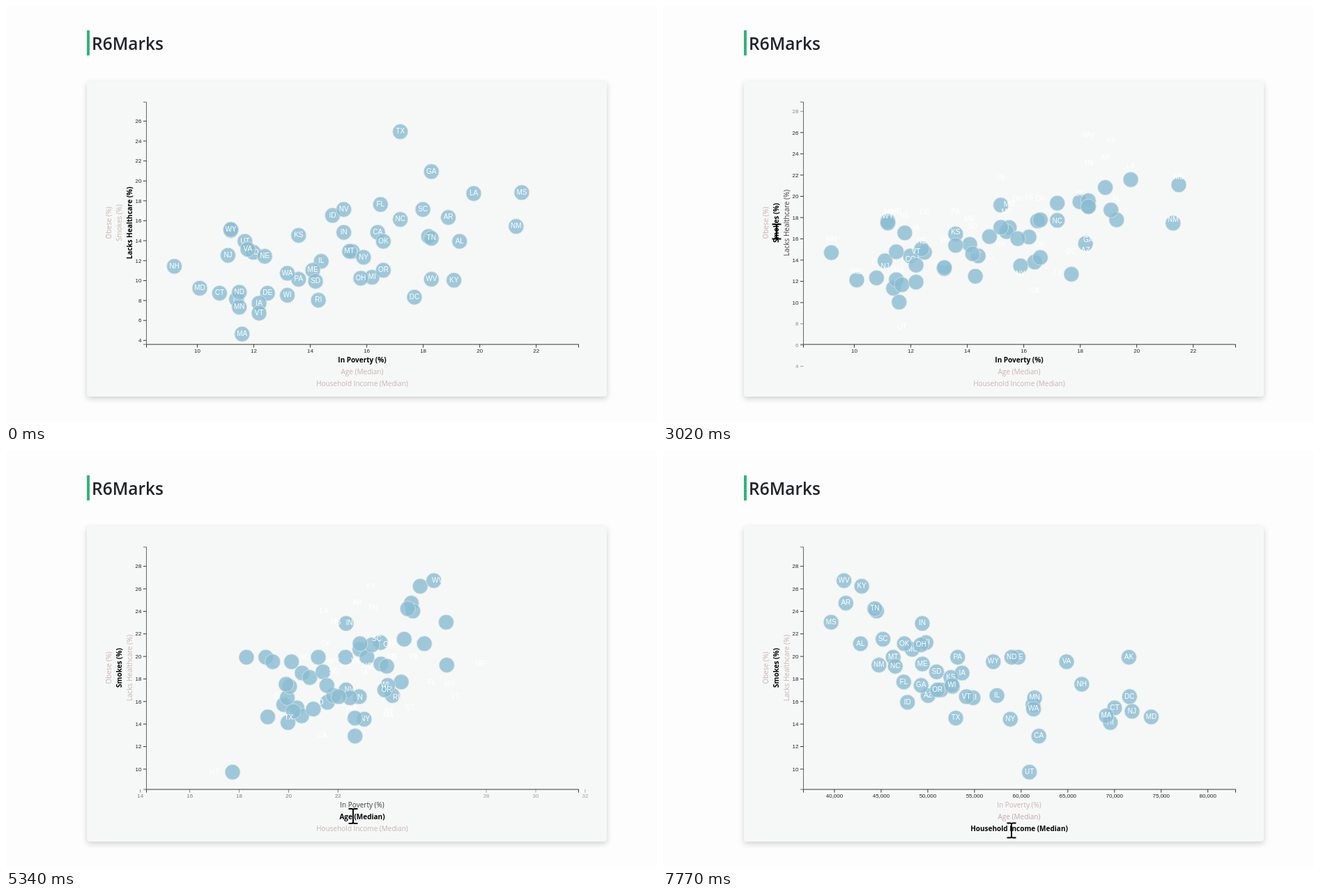
Animation, 934 px wide and 599 px high, one loop 8 s. Source, as an HTML page:

```html
<!DOCTYPE html>
<html lang="en">
<head>
<meta charset="utf-8">
<title>State chart</title>
<style>
  html, body { margin: 0; width: 100%; height: 100%; overflow: hidden; background: #fdfdfd; }
  #title {
    position: absolute; left: 123px; top: 35px; line-height: 36px;
    font: 600 24.5px/38px "Open Sans", "Noto Sans", sans-serif; color: #1f2428;
  }
  #bar { position: absolute; left: 116px; top: 35px; width: 4px; height: 36px; background: #30b573; }
  #card {
    position: absolute; left: 116px; top: 108px; width: 746px; height: 453px;
    background: #f6f8f7; border-radius: 4px; box-shadow: 0 3px 8px rgba(0, 0, 0, .18);
  }
  svg { position: absolute; left: 0; top: 0; width: 934px; height: 599px; }
  .tick text { font: 8px "Liberation Sans", Arial, sans-serif; fill: #222; }
  .tick line, .axis { stroke: #222; stroke-width: .9; fill: none; }
  .state circle { fill: #89bdd3; stroke: #e3e3e3; stroke-width: .9; opacity: .8; }
  .state text { font: 10px "Liberation Sans", Arial, sans-serif; fill: #fff; text-anchor: middle; }
  .label { font: 10px "Open Sans", "Noto Sans", sans-serif; text-anchor: middle; }
</style>
</head>
<body>
<div id="bar"></div>
<div id="title">R6Marks</div>
<div id="card"></div>
<svg viewBox="0 0 934 599">
  <clipPath id="inner"><rect x="126" y="118" width="725" height="433"/></clipPath>
  <g id="chart" clip-path="url(#inner)"></g>
  <g id="labels"></g>
  <g id="pointer"></g>
</svg>
<script>
const LOOP = 8000, MOVE = 570, FADE = 820;
const LEFT = 201, BOTTOM = 485.6, WIDTH = 620, HEIGHT = 348;

const names = ("AL AK AZ AR CA CO CT DE DC FL GA HI ID IL IN IA KS KY LA ME MD MA MI MN MS MO MT NE NV " +
  "NH NJ NM NY NC ND OH OK OR PA RI SC SD TN TX UT VT VA WA WV WI WY").split(" ");
const poverty = [19.3, 11.2, 18.2, 18.9, 16.4, 12, 10.8, 12.5, 17.7, 16.5, 18.3, 11.4, 14.8, 14.4, 15.2, 12.2, 13.6,
  19.1, 19.8, 14.1, 10.1, 11.6, 16.2, 11.5, 21.5, 15.5, 15.4, 12.4, 15.2, 9.2, 11.1, 21.3, 15.9, 17.2,
  11.5, 15.8, 16.6, 16.6, 13.6, 14.3, 18, 14.2, 18.3, 17.2, 11.7, 12.2, 11.8, 13.2, 18.3, 13.2, 11.2];
const age = [38.6, 33.3, 36.9, 37.8, 36, 36.3, 40.5, 39.6, 33.8, 41.6, 36.1, 38.1, 35.9, 37.5, 37.4, 38.2, 36.2,
  38.5, 36.1, 44.1, 38.3, 39.4, 39.6, 37.8, 36.7, 38.5, 39.6, 36.2, 37.4, 42.5, 39.4, 37.2, 38.2, 38.3,
  35.1, 39.4, 36.2, 39.3, 40.7, 39.8, 38.8, 36.6, 38.6, 34.3, 30.5, 42.8, 37.7, 37.5, 41.9, 39.2, 36.6];
const income = [42830, 71583, 50068, 41262, 61933, 61303, 70048, 59716, 71648, 47463, 49321, 69592, 47861, 57444,
  49446, 53712, 52504, 42958, 44555, 49462, 73971, 69160, 49847, 61481, 39680, 48363, 46328, 52686, 51450,
  66532, 71919, 44803, 58878, 46556, 59029, 49308, 47529, 51075, 53234, 54891, 45238, 50979, 44361, 53035,
  60922, 54166, 64902, 61366, 41059, 52622, 57055];
const healthcare = [13.9, 15, 14.4, 16.3, 14.8, 12.8, 8.7, 8.7, 8.3, 17.6, 20.9, 8.1, 16.5, 11.9, 14.8, 7.7, 14.5,
  10, 18.7, 11, 9.2, 4.6, 10.3, 7.3, 18.8, 12.9, 12.9, 12.4, 17.1, 11.4, 12.5, 15.4, 12.3, 16.1,
  8.8, 10.2, 13.9, 11, 10.1, 8, 17.1, 9.9, 14.2, 24.9, 13.9, 6.7, 13.1, 10.7, 10.1, 8.5, 15.1];
const smokes = [21.1, 19.9, 16.5, 24.7, 12.9, 15.7, 15.4, 19.9, 16.4, 17.7, 17.4, 14.1, 15.9, 16.5, 22.9, 18.5, 18.1,
  26.2, 24, 19.3, 14.6, 14.7, 21.2, 16.3, 23, 20.6, 19.9, 17.3, 17, 17.5, 15.1, 19.2, 14.4, 19.1,
  19.9, 21, 21.1, 17, 19.9, 16.3, 21.5, 18.6, 24.2, 14.5, 9.7, 16.4, 19.5, 15.3, 26.7, 17.4, 19.5];

const range = (a, b, step) => Array.from({ length: (b - a) / step + 1 }, (_, i) => a + i * step);
const view = (data, min, max, ticks) => ({ data, min, max, ticks });

const xAxis = {
  views: [view(poverty, 8.2, 23.5, range(10, 22, 2)), view(age, 27, 49.1, range(28, 48, 2)),
    view(income, 36680, 82971, range(40000, 80000, 5000))],
  clicks: [5075, 6990],
  place: u => LEFT + u * WIDTH
};
const yAxis = {
  views: [view(healthcare, 3.6, 27.9, range(4, 26, 2)), view(smokes, 8.2, 29.7, range(10, 28, 2))],
  clicks: [2735],
  place: u => BOTTOM - u * HEIGHT
};

// axis, view index (-1: never chosen), text, centre, half length
const labels = [
  [xAxis, 0, "In Poverty (%)", 508, 34], [xAxis, 1, "Age (Median)", 525, 33],
  [xAxis, 2, "Household Income (Median)", 542, 68],
  [yAxis, 0, "Lacks Healthcare (%)", 177, 50], [yAxis, 1, "Smokes (%)", 162, 28], [yAxis, -1, "Obese (%)", 147, 22]
].map(([axis, index, text, mid, half]) => ({ axis, index, text, mid, half }));

// time, x, y
const path = [[640, 359, 404], [810, 400, 432], [1100, 508, 543], [1330, 513, 509], [1600, 513, 509],
  [2250, 153, 322], [2430, 163, 324], [3700, 163, 324], [4090, 406, 458], [4540, 498, 524.5],
  [6130, 498, 524.5], [6400, 500, 545]];

const $ = id => document.getElementById(id);
function add(parent, tag, attrs = {}, text = "") {
  const el = document.createElementNS("http://www.w3.org/2000/svg", tag);
  set(el, attrs);
  el.textContent = text;
  parent.appendChild(el);
  return el;
}
function set(el, attrs) {
  for (const key in attrs) el.setAttribute(key, attrs[key]);
}
const clamp = v => Math.max(0, Math.min(1, v));
const mix = (a, b, p) => a + (b - a) * p;
const ease = u => u < .5 ? 4 * u ** 3 : 1 - 4 * (1 - u) ** 3;

const chart = $("chart");
const states = names.map(name => {
  const g = add(chart, "g", { class: "state" });
  return { dot: add(g, "circle", { r: 11 }), text: add(g, "text", {}, name) };
});

for (const axis of [xAxis, yAxis]) {
  const values = new Set(axis.views.flatMap(v => v.ticks));
  axis.ticks = [...values].map(value => {
    const g = add(chart, "g", { class: "tick" });
    const flat = axis === xAxis;
    add(g, "line", flat ? { y2: 4.6 } : { x2: -4.6 });
    add(g, "text", flat ? { y: 12.2, "text-anchor": "middle" } : { x: -7.1, y: 2.7, "text-anchor": "end" },
      value.toLocaleString("en-US"));
    return { g, value };
  });
}
add(chart, "path", { class: "axis", d: "M201.5 490.6V486.1H821.5V490.6" });
add(chart, "path", { class: "axis", d: "M197 138H201.5V486.1H197", style: "stroke:#555" });

for (const l of labels) {
  const spot = l.axis === xAxis ? `translate(511 ${l.mid + 3.7})` : `translate(${l.mid + 3.5} 311.5) rotate(-90)`;
  l.el = add($("labels"), "text", { class: "label", transform: spot }, l.text);
}

const outline = { fill: "#fff", stroke: "#222", "stroke-width": 1, "stroke-linejoin": "round" };
const pointers = {
  arrow: add($("pointer"), "path", { ...outline, d: "M.5 .5V21.5L5.3 17 8.8 24.5 12.2 23 8.8 15.8H15.5Z" }),
  beam: add($("pointer"), "path", { fill: "none", stroke: "#000", "stroke-width": 1.9,
    d: "M-6.5 -10.5H-2Q0 -10.5 0 -8.5V8.5Q0 10.5 -2 10.5H-6.5M6.5 -10.5H2Q0 -10.5 0 -8.5M6.5 10.5H2Q0 10.5 0 8.5" }),
  hand: add($("pointer"), "path", { ...outline,
    d: "M-2.5 1.5a2.5 2.5 0 0 1 5 0V10q4-1 5 1 3-1 4 2V20q0 4-3 8H-3Q-5 23-9.5 17.5q-1-3 2-3 2 0 5 4ZM2.5 10v5M7.5 11v4" })
};

function phase(axis, t) {
  const to = axis.clicks.filter(c => t >= c).length;
  const p = to ? ease(clamp((t - axis.clicks[to - 1]) / MOVE)) : 1;
  return { from: axis.views[Math.max(0, to - 1)], to: axis.views[to], p, index: to };
}
const at = (axis, v, value) => axis.place((value - v.min) / (v.max - v.min));

function cursorAt(t) {
  if (t < path[0][0]) return null;
  const i = path.findIndex(k => k[0] > t);
  if (i < 0) return path[path.length - 1].slice(1);
  const [a, b] = [path[i - 1], path[i]];
  const p = (t - a[0]) / (b[0] - a[0]);
  return [mix(a[1], b[1], p), mix(a[2], b[2], p)];
}

function drawTicks(axis, { from, to, p }) {
  for (const { g, value } of axis.ticks) {
    const opacity = mix(+from.ticks.includes(value), +to.ticks.includes(value), p);
    const pos = mix(at(axis, from, value), at(axis, to, value), p) + .5;
    g.style.display = opacity > 0 ? "" : "none";
    set(g, { opacity, transform: axis === xAxis ? `translate(${pos} 486.1)` : `translate(201.5 ${pos})` });
  }
}

function drawLabels(t, cursor) {
  let kind = "arrow";
  for (const l of labels) {
    const active = phase(l.axis, t).index === l.index;
    const [along, across] = l.axis === xAxis ? [511, 1] : [311.5, 0];
    const over = cursor && Math.abs(cursor[across] - l.mid) < 7.5 && Math.abs(cursor[1 - across] - along) < l.half;
    if (over) kind = active ? "beam" : "hand";
    const left = l.axis.clicks[l.index];
    const p = left === undefined ? 1 : clamp((t - left) / FADE);
    const wasActive = left !== undefined && t >= left;
    const c = wasActive ? p : 1;
    l.el.style.fontWeight = active || over ? 700 : 400;
    l.el.style.fill = active ? "#000" : over ? "#8878c3" : `rgb(${200 * c},${179 * c},${179 * c})`;
  }
  return kind;
}

function draw(t) {
  const x = phase(xAxis, t), y = phase(yAxis, t);
  states.forEach(({ dot, text }, i) => {
    const spot = (axis, v) => at(axis, v, v.data[i]);
    const endX = spot(xAxis, x.to), endY = spot(yAxis, y.to);
    set(dot, { cx: mix(spot(xAxis, x.from), endX, x.p), cy: mix(spot(yAxis, y.from), endY, y.p) });
    // captions jump straight to their new place
    set(text, { x: endX, y: endY + 2.7 });
  });
  drawTicks(xAxis, x);
  drawTicks(yAxis, y);

  const cursor = cursorAt(t);
  const kind = drawLabels(t, cursor);
  for (const key in pointers) pointers[key].style.display = cursor && key === kind ? "" : "none";
  if (cursor) set($("pointer"), { transform: `translate(${cursor[0]} ${cursor[1]})` });
}

const start = performance.now();
function frame() {
  draw((performance.now() - start) % LOOP);
  requestAnimationFrame(frame);
}
frame();
</script>
</body>
</html>
```
